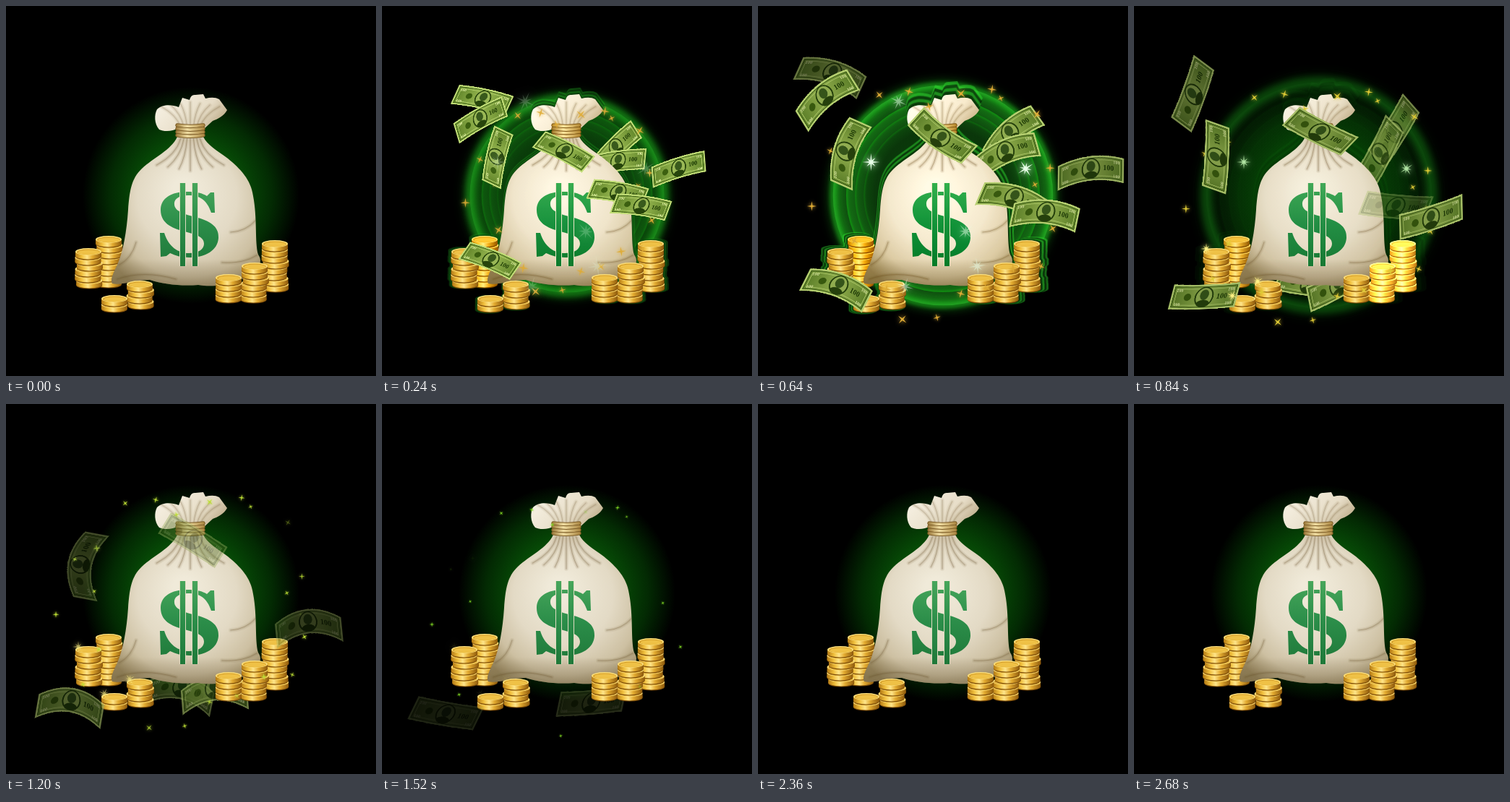
Animation of 512 by 512 pixels, one loop 2720 ms. Source, as an HTML page with a canvas:

```html
<!DOCTYPE html>
<html lang="en">
<head>
<meta charset="utf-8">
<title>Money bag</title>
<style>
html, body { margin: 0; width: 100%; height: 100%; overflow: hidden; background: #000; }
canvas { display: block; width: 100vmin; height: 100vmin; }
</style>
</head>
<body>
<canvas id="stage" width="512" height="512"></canvas>
<script>
const SIZE = 512, LOOP = 2720, STEP = 40, TAU = Math.PI * 2;
const START = 80, BURST = 480, DRIFT = 360; // ms
const CX = 256, CY = 262, RADIUS = 149;
const ctx = document.getElementById('stage').getContext('2d');

const clamp = (v, lo = 0, hi = 1) => Math.max(lo, Math.min(hi, v));
const ramp = (t, a, b) => clamp((t - a) / (b - a));
const mix = (a, b, k) => a + (b - a) * k;
const easeOut = k => 1 - (1 - k) ** 3;
const noise = n => { const v = Math.sin(n * 91.7 + 4.1) * 4375.85; return v - Math.floor(v); };
const pulse = (t, rise, peak, hold, end) => ramp(t, rise, peak) * (1 - ramp(t, hold, end));

function layer(w, h, draw) {
  const c = document.createElement('canvas');
  c.width = w;
  c.height = h;
  draw(c.getContext('2d'));
  return c;
}

function gradient(g, coords, ...stops) {
  const fill = coords.length === 4 ? g.createLinearGradient(...coords) : g.createRadialGradient(...coords);
  stops.forEach(([at, color]) => fill.addColorStop(at, color));
  return fill;
}

function ellipse(g, x, y, rx, ry, fill) {
  g.beginPath();
  g.ellipse(x, y, rx, ry, 0, 0, TAU);
  g.fillStyle = fill;
  g.fill();
}

// Coin stacks: x, top y, number of coins
const BACK_STACK = [142, 323, 8];
const STACKS = [[114, 340, 6], [185, 385, 4], [150, 405, 2], [372, 329, 8], [344, 360, 6], [308, 376, 4]];

function coin(g, x, y) {
  const rx = 18;
  const side = gradient(g, [x - rx, 0, x + rx, 0],
    [0, '#b37914'], [.25, '#f0bf3c'], [.45, '#ffe58a'], [.65, '#e2aa30'], [1, '#8d590c']);
  ellipse(g, x, y + 6.6, rx, 5, '#7a4a08');
  ellipse(g, x, y + 5.4, rx, 5, side);
  g.fillRect(x - rx, y, rx * 2, 5.4);
  ellipse(g, x, y, rx, 5, '#fbdd78');
  ellipse(g, x, y + .4, rx - 2, 3.8, '#d29a24');
  ellipse(g, x + .5, y + .7, rx - 3, 3.2, '#efc146');
}

function stack(g, [x, y, count]) {
  for (let i = count - 1; i >= 0; i--) {
    coin(g, x + (i && noise(i + x) * 4 - 2), y + i * 8);
  }
}

const BODY = new Path2D(`M237 181 C229 199 204 210 188 225 C173 239 171 257 169 282
  C167 312 162 340 154 358 C148 371 144 378 147 384 C160 387 178 379 199 379
  C218 385 242 388 266 386 C290 390 325 385 344 366 C353 358 354 351 349 344
  C344 327 348 294 342 263 C339 240 324 225 307 211 C291 199 279 193 273 181 Z`);
const TUFT = new Path2D(`M238 169 C231 174 218 174 212 171 C205 163 205 150 209 143
  C218 135 230 137 239 140 L244 127 L254 130 Q256 122 262 123 L273 122 L276 128
  Q288 125 295 129 L306 144 C302 152 292 157 286 159 L273 171 Z`);
const LETTER = new Path2D(`M288 258 L289 286 L284 286 C278 268 268 262 252 262
  C238 262 232 268 233 275 C234 284 246 288 262 292 C282 297 295 305 294 321
  C293 338 276 348 254 348 C242 348 234 345 227 342 L222 346 L214 347 L213 314
  L219 314 C225 333 238 342 253 342 C267 342 274 336 274 329 C274 319 262 316 247 312
  C228 307 214 300 214 282 C214 266 229 257 250 257 C264 257 272 259 278 263 L283 258 Z`);
const CREASES = new Path2D('M157 358 Q174 349 180 327 M154 378 Q190 365 235 378 M346 296 Q332 312 311 313 M347 345 Q328 357 299 355');

// Creases fan out from the neck, down the body or up into the tuft.
function fan(y, length, spread) {
  const path = new Path2D();
  for (let i = -3; i <= 3; i++) {
    const x = 255 + i * 4.5, reach = length * (1 - Math.abs(i) * .06);
    path.moveTo(x, y);
    path.quadraticCurveTo(x + i * 2, y + reach * .6, x + i * spread, y + reach);
  }
  return path;
}

function crease(g, path, strength) {
  for (const width of [6, 3, 1]) {
    g.lineWidth = width;
    g.strokeStyle = `rgba(105,82,45,${strength / (width + 1)})`;
    g.stroke(path);
  }
}

function bag(g) {
  g.lineCap = 'round';
  g.fillStyle = gradient(g, [246, 255, 15, 256, 275, 135],
    [0, '#f0ead9'], [.45, '#e3dac5'], [.75, '#cdc0a2'], [1, '#98875f']);
  g.fill(BODY);
  g.save();
  g.clip(BODY);
  g.fillStyle = gradient(g, [0, 350, 0, 392], [0, 'rgba(95,78,45,0)'], [1, 'rgba(95,78,45,.45)']);
  g.fillRect(130, 350, 240, 44);
  crease(g, fan(184, 44, 11), .55);
  crease(g, CREASES, .5);
  g.restore();

  g.fillStyle = gradient(g, [220, 122, 290, 185], [0, '#f7f1e3'], [.6, '#e6dcc6'], [1, '#b09c76']);
  g.fill(TUFT);
  g.save();
  g.clip(TUFT);
  crease(g, fan(167, -34, 9), .4);
  g.restore();

  const rope = gradient(g, [235, 0, 275, 0], [0, '#9a7838'], [.4, '#f0dda2'], [1, '#a9843f']);
  for (let y = 165; y < 182; y += 4.6) {
    for (const [width, color] of [[5.4, '#7c5c26'], [3.6, rope]]) {
      g.beginPath();
      g.moveTo(237, y);
      g.quadraticCurveTo(255, y + 3, 273, y);
      g.lineWidth = width;
      g.strokeStyle = color;
      g.stroke();
    }
  }

  const green = gradient(g, [0, 245, 0, 360], [0, '#47a65b'], [.5, '#2b8d49'], [1, '#1f7839']);
  g.fillStyle = green;
  g.fill(LETTER);
  for (const x of [241, 258]) {
    g.fillStyle = '#dfdbc0';
    g.fillRect(x - 1, 245, 9, 115);
    g.fillStyle = green;
    g.fillRect(x, 245, 7, 115);
  }
}

const bagLayer = layer(SIZE, SIZE, g => { stack(g, BACK_STACK); bag(g); });
const coinLayer = layer(SIZE, SIZE, g => STACKS.forEach(s => stack(g, s)));
const shineLayer = layer(SIZE, SIZE, g => STACKS.slice(3, 5).forEach(s => stack(g, s)));
const silhouette = color => layer(SIZE, SIZE, g => {
  g.drawImage(bagLayer, 0, 0);
  g.drawImage(coinLayer, 0, 0);
  g.globalCompositeOperation = 'source-in';
  g.fillStyle = color;
  g.fillRect(0, 0, SIZE, SIZE);
});
const greenShape = silhouette('#35ee35');
const blackShape = silhouette('#021202');

const NOTE_W = 92, NOTE_H = 34, MARGIN = 20;
const note = layer(NOTE_W * 2, NOTE_H * 2, g => {
  const mid = NOTE_W / 2;
  g.scale(2, 2);
  g.fillStyle = '#b3cd6e';
  g.fillRect(0, 0, NOTE_W, NOTE_H);
  g.fillStyle = gradient(g, [0, 0, NOTE_W, 0], [0, '#587a26'], [.5, '#91ae4e'], [1, '#587a26']);
  g.fillRect(3, 3, NOTE_W - 6, NOTE_H - 6);
  for (const [inset, color] of [[3, '#3a5a14'], [6, '#a4c062']]) {
    g.strokeStyle = color;
    g.strokeRect(inset, inset, NOTE_W - inset * 2, NOTE_H - inset * 2);
  }
  ellipse(g, mid, 17, 13, 14, '#25400c');
  ellipse(g, mid, 17, 11, 12.5, '#8fab50');
  ellipse(g, mid, 14, 6, 7, '#35541a');
  ellipse(g, mid, 26, 9, 5, '#25400c');
  ellipse(g, 23, 17, 5, 5, '#38590f');
  g.fillStyle = '#213d08';
  g.font = 'bold 10px "Liberation Serif", serif';
  g.fillText('100', 63, 20);
  g.fillStyle = '#d3e29a';
  g.font = 'bold 6px "Liberation Serif", serif';
  for (const x of [6, NOTE_W - 15]) for (const y of [10, 29]) g.fillText('100', x, y);
});

const bent = layer(NOTE_W * 2, (NOTE_H + MARGIN * 2) * 2, () => {});
function bentNote(bend) {
  const g = bent.getContext('2d');
  g.clearRect(0, 0, bent.width, bent.height);
  for (let x = 0; x < bent.width; x++) {
    const u = x / NOTE_W - 1;
    g.drawImage(note, x, 0, 1, NOTE_H * 2, x, (MARGIN + bend * (u * u * 1.8 - .7)) * 2, 1, NOTE_H * 2);
  }
  return bent;
}

// Position and angle at the end of the burst and after the first drift, and the end of the fade.
const BILLS = [
  { burst: [250, 322, 20], drift: [244, 384, 8], end: 1480, behind: true },
  { burst: [262, 330, 50], drift: [282, 386, -28], end: 1700, behind: true },
  { burst: [343, 181, -30], drift: [360, 174, -58], end: 1100, behind: true },
  { burst: [346, 205, 8], drift: [340, 204, -62], end: 1100, behind: true },
  { burst: [107, 95, 27], drift: [95, 95, 5], end: 720 },
  { burst: [103, 130, -14], drift: [82, 122, -70], end: 1120 },
  { burst: [132, 197, -62], drift: [114, 209, -87], end: 1440 },
  { burst: [251, 187, 42], drift: [257, 174, 27], end: 1440 },
  { burst: [346, 260, 25], drift: [362, 277, 5], end: 940 },
  { burst: [387, 284, 23], drift: [411, 293, -18], end: 1440 },
  { burst: [453, 217, -2], drift: [470, 242, -12], end: 800 },
  { burst: [121, 379, 37], drift: [97, 402, -2], end: 1660 }
];

// Bills shoot from the bag, drift, then sink while the sideways speed dies away.
function poseAt({ burst, drift }, t) {
  const launch = easeOut(ramp(t, START, BURST)), k = ramp(t, BURST, BURST + DRIFT);
  const late = Math.max(0, (t - BURST - DRIFT) / DRIFT);
  const coast = k + .4 * (1 - Math.exp(-1.5 * late));
  return {
    x: mix(CX, mix(burst[0], drift[0], coast), launch),
    y: mix(252, mix(burst[1], drift[1], k), launch) + 14 * late,
    angle: mix(burst[2], drift[2], k - .3 * clamp(late)) - 70 * (1 - launch),
    size: mix(.25, 1, launch)
  };
}

function drawBill(bill, t) {
  const alpha = pulse(t, START, 200, mix(BURST, bill.end, .4), bill.end);
  if (!alpha) return;
  const { x, y, angle, size } = poseAt(bill, t);
  const flutter = Math.cos(TAU * (t - BURST) / (DRIFT * 2));
  const cup = clamp((32 - angle) / 6, -1, 1);
  ctx.save();
  ctx.globalAlpha = alpha;
  ctx.translate(x, y);
  ctx.rotate(angle * Math.PI / 180);
  ctx.transform(size, 0, .15 * (flutter - 1) * size, size, 0, 0);
  ctx.filter = `brightness(${mix(1.08, .85, ramp(t, BURST, 1000))})`;
  ctx.drawImage(bentNote((4 + 5 * flutter) * cup), -NOTE_W / 2, -NOTE_H / 2 - MARGIN, NOTE_W, NOTE_H + MARGIN * 2);
  ctx.restore();
}

function star(x, y, r, color, alpha, points = 4, turn = 0) {
  if (alpha <= 0) return;
  ctx.save();
  ctx.globalAlpha = alpha;
  ctx.translate(x, y);
  ctx.rotate(turn);
  ctx.beginPath();
  for (let i = 0; i < points * 2; i++) {
    const d = r * (i % 2 ? .22 : points > 4 && i % 4 ? .7 : 1);
    ctx.lineTo(Math.cos(i * Math.PI / points) * d, Math.sin(i * Math.PI / points) * d);
  }
  ctx.fillStyle = color;
  ctx.shadowColor = color;
  ctx.shadowBlur = r * .8;
  ctx.fill();
  ctx.restore();
}

const SPARKS = 24;
function drawSparks(t) {
  const s = Math.max(0, t - BURST) / 1000, launch = easeOut(ramp(t, START, BURST));
  const hue = mix(42, 110, ramp(t, 650, 1900)), light = mix(54, 36, ramp(t, 1300, 2200));
  for (let i = 0; i < SPARKS; i++) {
    const angle = (i + noise(i)) / SPARKS * TAU, reach = mix(125, 185, noise(i + 50)) * launch;
    const end = mix(1100, 2440, noise(i + 90));
    const x = CX + Math.cos(angle) * (reach + 8 * Math.sin(s * 1.8));
    const y = CY + Math.sin(angle) * reach + 8 * s + 20 * s * s;
    const size = mix(7, 1.5, ramp(t, 700, 1950)) * mix(.7, 1.1, noise(i + 8));
    star(x, y, size, `hsl(${hue} 72% ${light}%)`, pulse(t, START, 260, end - 350, end), 4, i);
  }
}

const FLASHES = [[160, 216], [365, 225], [198, 132], [298, 360], [282, 312], [207, 388]];
function drawFlashes(t) {
  const k = ramp(t, BURST, BURST + DRIFT);
  FLASHES.forEach(([x, y], i) => {
    const end = i < 2 ? 1080 : 760;
    star(x + (x < CX ? -8 : 12) * k, y, mix(14, 10, k), k < .6 ? '#e8ffe8' : '#b8edaa',
      pulse(t, 200, 400, end - 260, end), 8, i);
  });
  STACKS.slice(0, 3).forEach(([x, y], i) => star(x - 14, y - 4, 8, '#fff184', pulse(t, 640, 800, 1000, 1560), 8, i));
}

function drawGlow(t, flash) {
  ellipse(ctx, CX, CY, 150, 150, gradient(ctx, [CX, CY, 0, CX, CY, 150],
    [0, '#075c07'], [.5, '#064806'], [.75, '#032a03'], [1, '#000']));
  if (!flash) return;

  const grow = mix(.55, 1, easeOut(ramp(t, START, BURST))) + .05 * ramp(t, BURST, BURST + DRIFT);
  const r = RADIUS * grow, hot = flash * flash;
  ctx.save();
  ctx.globalAlpha = hot;
  // Nested discs, each fading inwards from a bright rim.
  for (const [scale, light] of [[1, 50], [.88, 34], [.8, 24], [.72, 16]]) {
    const rim = r * scale;
    ellipse(ctx, CX, CY, rim, rim, gradient(ctx, [CX, CY, 0, CX, CY, rim],
      [.6, '#0a3a0a'], [.86, `hsl(120 65% ${light * .65}%)`], [.97, `hsl(120 70% ${light}%)`], [1, `hsl(120 85% ${light + 14}%)`]));
  }
  ctx.restore();

  ctx.save();
  ctx.globalAlpha = mix(.3, .8, hot);
  ctx.globalAlpha *= clamp(flash * 4);
  ctx.strokeStyle = ctx.shadowColor = '#1fc01f';
  ctx.shadowBlur = 14;
  ctx.filter = `blur(${mix(5, 0, hot)}px)`;
  ctx.lineWidth = mix(14, 3, hot);
  ctx.beginPath();
  ctx.arc(CX, CY, r, 0, TAU);
  ctx.stroke();
  ctx.restore();
}

// Alternating green and dark copies leave thin outlines around the bag.
function drawEchoes(t, flash) {
  const spread = mix(.4, 1, ramp(t, START, BURST)) + ramp(t, BURST, BURST + DRIFT) * .6;
  for (let i = 0; i < 4; i++) {
    const k = 1 + .052 * (1 - i / 4) * spread;
    ctx.save();
    ctx.globalAlpha = i % 2 ? flash : flash * flash;
    ctx.translate(228, 396);
    ctx.scale(k, k);
    ctx.drawImage(i % 2 ? blackShape : greenShape, -228, -396);
    ctx.restore();
  }
}

function render(t) {
  const flash = pulse(t, START, 400, 840, 1120) * (1 - .8 * ramp(t, 500, 840));
  ctx.fillStyle = '#000';
  ctx.fillRect(0, 0, SIZE, SIZE);
  drawGlow(t, flash);
  if (flash) drawEchoes(t, flash);
  BILLS.filter(b => b.behind).forEach(b => drawBill(b, t));

  ctx.save();
  if (flash) ctx.filter = `contrast(${1 + .25 * flash}) saturate(${1 + .2 * flash})`;
  ctx.drawImage(bagLayer, 0, 0);
  ctx.restore();
  ctx.drawImage(coinLayer, 0, 0);

  ctx.save();
  ctx.globalAlpha = pulse(t, 700, 820, 860, 1040) * .3;
  ctx.globalCompositeOperation = 'lighter';
  ctx.drawImage(shineLayer, 0, 0);
  ctx.restore();

  drawSparks(t);
  BILLS.filter(b => !b.behind).forEach(b => drawBill(b, t));
  drawFlashes(t);
}

function frame() {
  const t = performance.now() % LOOP;
  render(Math.floor(t / STEP) * STEP);
  requestAnimationFrame(frame);
}
frame();
</script>
</body>
</html>
```
